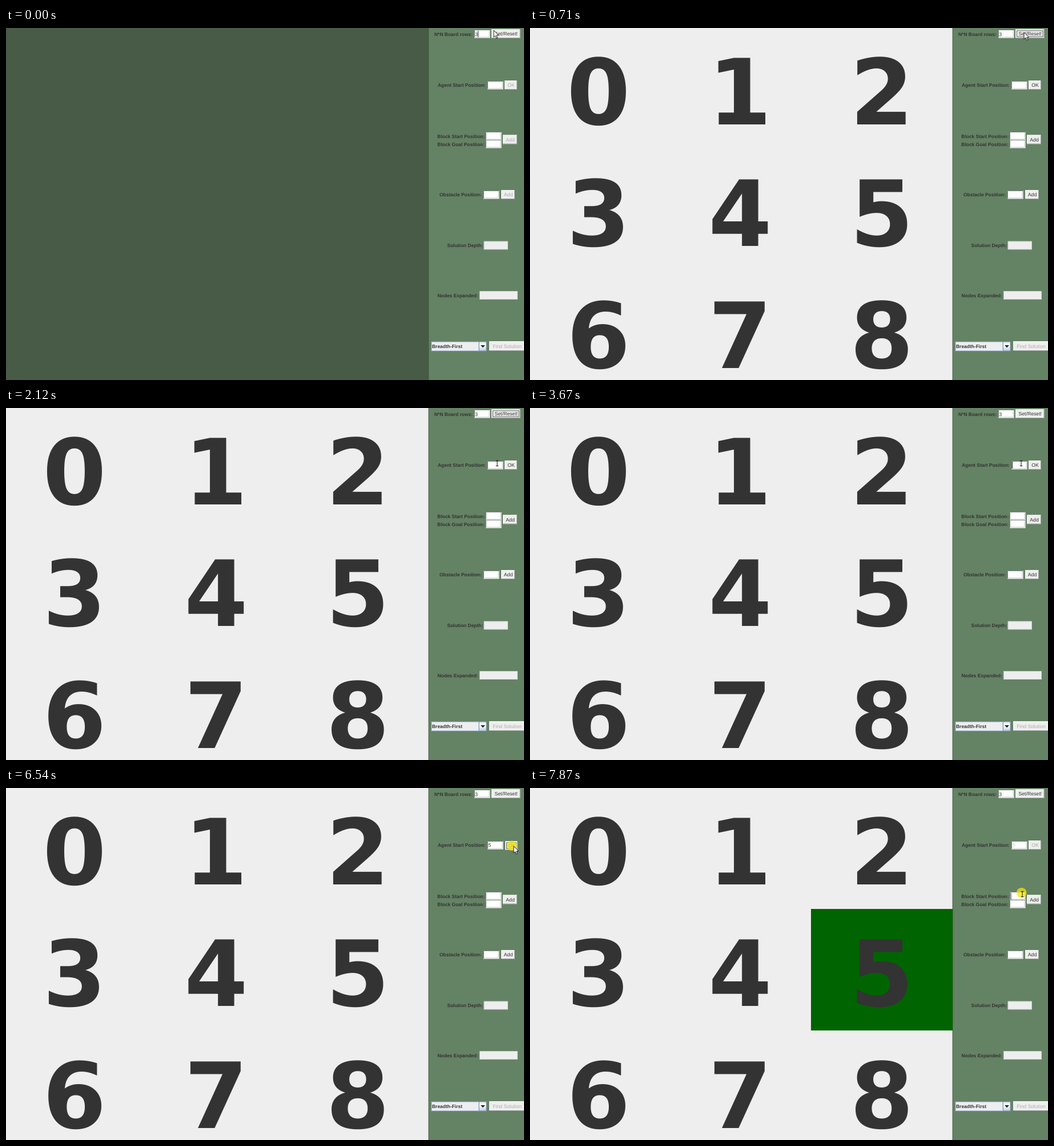
An HTML page that plays this animation: 907 px wide and 617 px high, repeating every 8 s.

```html
<!DOCTYPE html>
<html lang="en">
<head>
<meta charset="utf-8">
<title>Board setup</title>
<style>
  html, body { margin: 0; width: 100%; height: 100%; overflow: hidden; background: #648264; }
  svg { display: block; width: 907px; height: 617px; }
  text { font-family: "Liberation Sans", Arial, sans-serif; font-size: 8.7px; fill: #333; text-rendering: geometricPrecision; white-space: pre; }
  .label { font-size: 8.45px; font-weight: bold; }
  .digit { font: bold 160px "DejaVu Sans", Verdana, sans-serif; text-anchor: middle; }
  .mid { text-anchor: middle; }
</style>
</head>
<body>
<svg id="stage" viewBox="0 0 907 617">
  <defs>
    <linearGradient id="shine" x1="0" y1="0" x2="0" y2="1">
      <stop offset="0" stop-color="#dfe9f3"/><stop offset=".4" stop-color="#fff"/><stop offset="1" stop-color="#b8cfe5"/>
    </linearGradient>
  </defs>
</svg>
<script>
const LOOP = 8000;
const stage = document.getElementById('stage');

function add(parent, tag, attrs, text) {
  const node = document.createElementNS('http://www.w3.org/2000/svg', tag);
  for (const key in attrs) node.setAttribute(key, attrs[key]);
  if (text !== undefined) node.textContent = text;
  parent.appendChild(node);
  return node;
}
const box = (parent, x, y, width, height, fill, more) =>
  add(parent, 'rect', { x, y, width, height, fill, ...more });
const show = (node, on) => node.setAttribute('visibility', on ? 'visible' : 'hidden');

// Board
box(stage, 740, 0, 167, 617, '#648264');
const empty = box(stage, 0, 0, 740.5, 617, '#475b46');
const board = add(stage, 'g', {});
box(board, 0, 0, 740, 617, '#eee');
box(board, 739.6, 0, 1, 617, '#47604a');
const agentCell = box(board, 492, 212, 248, 213, '#006400');
for (let i = 0; i < 9; i++) {
  const nudge = i === 1 ? -0.5 : 0;
  add(board, 'text', { class: 'digit', x: 120 + 248 * (i % 3) + nudge, y: 168.7 + 213.5 * Math.floor(i / 3) }, i);
}

// Side panel
const labels = [
  [750, 13.5, 'N*N Board rows:'], [756, 103.4, 'Agent Start Position:'],
  [755.3, 192.5, 'Block Start Position:'], [755.3, 207, 'Block Goal Position:'],
  [759, 295.2, 'Obstacle Position:'], [772.5, 384.2, 'Solution Depth:'], [755.5, 471.8, 'Nodes Expanded:']
];
for (const [x, y, text] of labels) add(stage, 'text', { class: 'label', x, y }, text);

function field(x, y, h = 14.5) {
  box(stage, x, y, 27.5, h, '#fff');
  add(stage, 'path', { d: `M${x + .5} ${y + h - 1}V${y + .5}H${x + 27}`, fill: 'none', stroke: '#7d8a80' });
  add(stage, 'path', { d: `M${x + 1} ${y + h - 1.6}H${x + 26}V${y + 1}`, fill: 'none', stroke: '#b5bdb7', 'stroke-width': .8 });
}
field(820, 3);
field(843, 93);
field(840, 182);
field(840, 196);
field(836, 285);
for (const [x, y, w] of [[836.5, 373.5, 42.5], [829, 461, 67]])
  box(stage, x + .5, y + .5, w - 1, 14, '#eee', { stroke: '#c3cfd3' });

function button(x, y, w, h, text) {
  const group = add(stage, 'g', {});
  box(group, x, y, w, h, '#eee');
  add(group, 'path', { d: `M${x + .5} ${y + h}V${y + .5}H${x + w}`, fill: 'none', stroke: '#fafafa' });
  add(group, 'path', { d: `M${x} ${y + h - .4}H${x + w - .4}V${y}`, fill: 'none', stroke: '#76877a', 'stroke-width': .8 });
  const ring = box(group, x + 2.5, y + 2.8, w - 5, h - 5.6, 'none', { stroke: '#55505c', 'stroke-width': .9 });
  const caption = add(group, 'text', { class: 'mid', x: x + w / 2 + .5, y: y + h / 2 + 3.4 }, text);
  return (enabled, focused, pressed) => {
    caption.style.fill = enabled ? '#333' : '#adadad';
    show(ring, focused);
    group.setAttribute('transform', pressed ? 'translate(1 1)' : '');
  };
}
const setButton = button(850, 2, 50.5, 16, 'Set/Reset!');
const okButton = button(873, 92, 22, 16, 'OK');
const blockButton = button(870, 187.5, 25, 16, 'Add');
const obstacleButton = button(867, 284, 24, 16, 'Add');
const findButton = button(846, 549, 62, 17, 'Find Solution');
findButton(false, false, false);

// Strategy list
box(stage, 744.5, 549.5, 97, 17, '#eee', { stroke: '#7a8a99' });
box(stage, 745.5, 550.5, 82, 15, 'none', { stroke: '#b8cfe5' });
box(stage, 828.5, 550, 12.5, 16, 'url(#shine)', { stroke: '#7a8a99', 'stroke-width': .8 });
add(stage, 'path', { d: 'M831 556H839L835 560.3Z', fill: '#222' });
add(stage, 'text', { class: 'label', x: 746, y: 561 }, 'Breadth-First');

// Typed values and carets
add(stage, 'text', { x: 821.3, y: 13.7 }, '3');
const agentText = add(stage, 'text', { x: 844.5, y: 103.4 }, '5');
const caret = box(stage, 0, 0, 1, 12, '#333');

// Pointer
const halo = add(stage, 'circle', { r: 8.8, fill: '#f4e60a', opacity: .74 });
const arrow = add(stage, 'path', {
  d: 'M0 0V12L2.8 9.5 4.8 14 6.7 13.2 4.8 8.8H8.5Z', fill: '#fff', stroke: '#000', 'stroke-width': .85
});
const beam = add(stage, 'path', {
  d: 'M-2.3 -4.6H2.3M0 -4.6V4.6M-2.3 4.6H2.3', fill: 'none', stroke: '#111', 'stroke-width': 1
});

// Each move: start, end, number of steps, points evenly spaced in time
const moves = [
  [10, 320, 4, [[854, 4], [858, 5], [865, 7.5]]],
  [1091, 2120, 13, [[865, 7.5], [842, 32], [827, 70], [839, 101], [856, 95], [860, 97]]],
  [5753, 6220, 6, [[860, 97], [876, 128], [889, 150], [893, 130], [893, 107]]],
  [6300, 6460, 2, [[893, 107], [889, 102]]],
  [6932, 7790, 11, [[889, 102], [884, 122], [872, 155], [864, 180], [862, 186]]]
];

function pointerAt(t) {
  let at = moves[0][3][0];
  for (const [start, end, steps, points] of moves) {
    if (t < start) break;
    const step = Math.min(steps, Math.floor((t - start) / (end - start) * steps + 1e-6));
    const place = step / steps * (points.length - 1);
    const i = Math.min(points.length - 2, Math.floor(place));
    at = points[i].map((v, k) => v + (points[i + 1][k] - v) * (place - i));
  }
  return at;
}

const during = (t, ...spans) => spans.some(([from, to]) => t >= from && t < to);
const inField = (x, y) => (x > 843 && x < 870 && y > 93 && y < 107) || (x > 840 && x < 867 && y > 182 && y < 211);

function caretAt(t) {
  if (during(t, [0, 170])) return [826.2, 4.5];
  if (during(t, [2660, 3130], [3670, 4130], [4670, 5130])) return [844, 94];
  if (during(t, [5510, 5990])) return [849.2, 94];
  if (during(t, [6690, 7170], [7640, LOOP])) return [841.6, 183.5];
  return null;
}

function draw(t) {
  const ready = t >= 710, placed = t >= 6690;
  show(empty, !ready);
  show(board, ready);
  for (const node of board.children) show(node, ready && (node !== agentCell || placed));

  setButton(true, during(t, [560, 2660]), during(t, [560, 710]));
  okButton(ready && !placed, during(t, [6540, 6690]), during(t, [6540, 6690]));
  blockButton(ready, false, false);
  obstacleButton(ready, false, false);

  show(agentText, t >= 5510);
  agentText.style.fill = placed ? '#d2d2d2' : '#333';
  const spot = caretAt(t);
  show(caret, spot);
  if (spot) {
    caret.setAttribute('x', spot[0]);
    caret.setAttribute('y', spot[1]);
  }

  const [x, y] = pointerAt(t);
  const typing = inField(x, y);
  show(arrow, !typing);
  show(beam, typing);
  (typing ? beam : arrow).setAttribute('transform', `translate(${x} ${y})`);
  show(halo, during(t, [560, 710], [2660, 2810], [6540, 6690], [7870, LOOP]));
  halo.setAttribute('cx', x - (typing ? 1.3 : t > 6000 ? 3 : 0));
  halo.setAttribute('cy', y - (typing ? 2.5 : t > 6000 ? 1 : -.5));
}

const origin = performance.now();
function tick() {
  draw((performance.now() - origin) % LOOP);
  requestAnimationFrame(tick);
}
tick();
</script>
</body>
</html>
```
